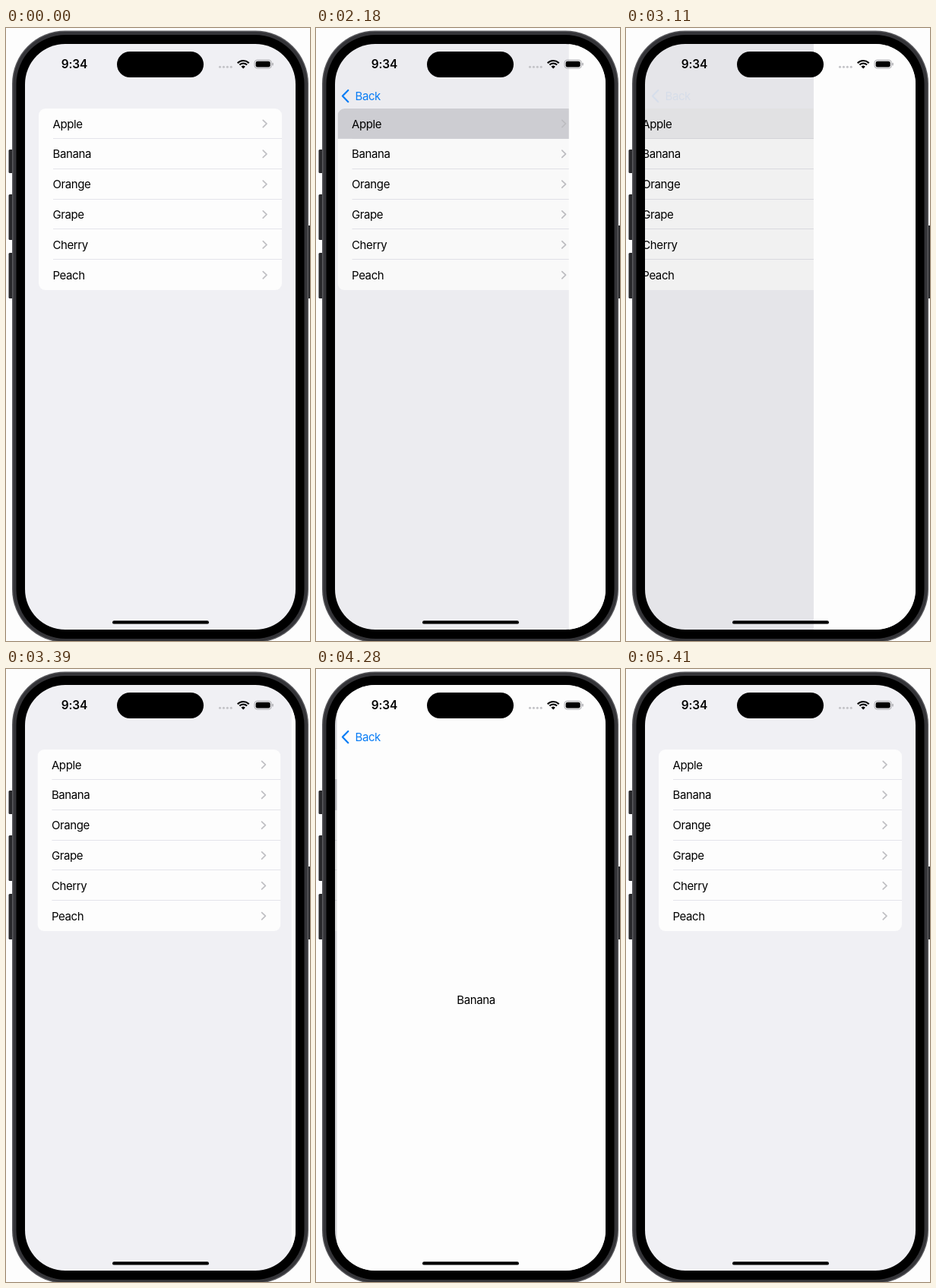
An HTML page with a canvas for the animation above (5450 ms loop, 400x807 px).

```html
<!DOCTYPE html>
<html lang="en">
<head>
<meta charset="utf-8">
<title>Fruit list</title>
<style>
html, body { margin: 0; width: 100%; height: 100%; overflow: hidden; background: #fdfdfd; }
canvas { display: block; width: 400px; height: 807px; }
</style>
</head>
<body>
<canvas id="stage"></canvas>
<script>
const W = 400, H = 807, LOOP = 5450;
const FRUITS = ['Apple', 'Banana', 'Orange', 'Grape', 'Cherry', 'Peach'];
// A tap pushes the detail page; a swipe of the given length pulls it away
const VISITS = [
  { row: 0, push: 2145, swipe: 2637, length: 813 },
  { row: 1, push: 3885, swipe: 4297, length: 926 }
];
const SCREEN = { x: 25, y: 21, w: 356, h: 771 };
const CARD = { x: 43, y: 106, w: 320, row: 39.85 };
const PAPER = '#fdfdfd';
const FONT = 'Inter, "Liberation Sans", sans-serif';

const canvas = document.getElementById('stage');
const ctx = canvas.getContext('2d');
const dpr = window.devicePixelRatio || 1;
canvas.width = W * dpr;
canvas.height = H * dpr;

const clamp = v => Math.max(0, Math.min(1, v));
const smooth = u => u * u * (3 - 2 * u);

// Critically damped spring, 0 to 1
function spring(ms) {
  if (ms <= 0) return 0;
  const k = ms * 0.0178;
  return 1 - (1 + k) * Math.exp(-k);
}

function rounded(x, y, w, h, r) {
  ctx.beginPath();
  ctx.roundRect(x, y, w, h, r);
}

function fillRound(x, y, w, h, r, color) {
  rounded(x, y, w, h, r);
  ctx.fillStyle = color;
  ctx.fill();
}

function line(points, color, width) {
  ctx.beginPath();
  points.forEach(([x, y]) => ctx.lineTo(x, y));
  ctx.strokeStyle = color;
  ctx.lineWidth = width;
  ctx.lineCap = ctx.lineJoin = 'round';
  ctx.stroke();
}

function label(str, x, y, color = '#000', align = 'left', weight = 400, size = 15, gap = -0.4) {
  ctx.font = `${weight} ${size}px ${FONT}`;
  ctx.letterSpacing = gap + 'px';
  ctx.textAlign = align;
  ctx.fillStyle = color;
  ctx.fillText(str, x, y);
}

function drawBody() {
  ctx.fillStyle = PAPER;
  ctx.fillRect(0, 0, W, H);
  for (const [y, h] of [[160, 31], [219, 60], [296, 60]]) fillRound(3.5, y, 8, h, 1.5, '#29292c');
  fillRound(394, 260, 6.5, 96, 1, '#29292c');
  fillRound(8, 3.5, 390, 805.5, 70, '#58585c');
  fillRound(9.5, 5, 387, 802.5, 68, '#343438');
  fillRound(13.5, 9, 379, 795, 65, '#000');
}

function drawList(shift, cover, mark) {
  ctx.fillStyle = '#f0f0f4';
  ctx.fillRect(SCREEN.x, SCREEN.y, SCREEN.w, SCREEN.h);
  ctx.save();
  ctx.translate(-shift, 0);
  const { x, y, w, row } = CARD;
  const height = row * FRUITS.length;

  ctx.save();
  rounded(x, y, w, height, 9);
  ctx.clip();
  ctx.fillStyle = PAPER;
  ctx.fillRect(x, y, w, height);
  for (let i = 1; i < FRUITS.length; i++) {
    ctx.fillStyle = '#e4e4ea';
    ctx.fillRect(62, Math.round(y + i * row) - 1, w, 1);
  }
  if (mark.alpha > 0) {
    ctx.globalAlpha = mark.alpha;
    ctx.fillStyle = '#d0d0d5';
    ctx.fillRect(x, y + mark.row * row - 0.5, w, row + 0.5);
  }
  ctx.restore();

  FRUITS.forEach((name, i) => {
    const mid = y + (i + 0.5) * row;
    label(name, 61.5, mid + 5.7);
    line([[338.2, mid - 4.6], [343, mid], [338.2, mid + 4.6]], '#c0c0c4', 1.7);
  });
  ctx.restore();

  ctx.fillStyle = `rgba(0,0,0,${cover * 0.13})`;
  ctx.fillRect(SCREEN.x, SCREEN.y, SCREEN.w, SCREEN.h);
}

function drawDetail(name, offset) {
  const x = SCREEN.x + offset;
  ctx.fillStyle = PAPER;
  ctx.fillRect(x, SCREEN.y, SCREEN.w, SCREEN.h);
  label(name, 208 + offset, 441, '#000', 'center');
}

function drawBack(alpha) {
  ctx.save();
  ctx.globalAlpha = alpha;
  const blue = '#0a7df5';
  line([[42.3, 82], [34.9, 89.6], [42.3, 97.2]], blue, 2.2);
  label('Back', 51.5, 95, blue);
  ctx.restore();
}

function drawStatus() {
  label('9:34', 90, 53.2, '#000', 'center', 600, 15.4, -0.1);
  fillRound(146, 31, 114, 34, 17, '#000');
  for (let i = 0; i < 4; i++) fillRound(280 + i * 4.9, 49.7, 3, 3, 1.5, '#c2c2c6');

  // Wi-Fi arcs fanning up from one point
  ctx.strokeStyle = '#000';
  ctx.lineCap = 'butt';
  ctx.lineWidth = 2.2;
  for (const r of [10.2, 6.7]) {
    ctx.beginPath();
    ctx.arc(312.2, 53.2, r, -Math.PI * 0.76, -Math.PI * 0.24);
    ctx.stroke();
  }
  ctx.beginPath();
  ctx.moveTo(312.2, 53.4);
  ctx.arc(312.2, 53.4, 3.7, -Math.PI * 0.76, -Math.PI * 0.24);
  ctx.fillStyle = '#000';
  ctx.fill();

  rounded(327, 42.2, 22.3, 10.8, 3.5);
  ctx.strokeStyle = '#a6a6aa';
  ctx.lineWidth = 1;
  ctx.stroke();
  fillRound(328.6, 43.8, 19.1, 7.6, 2.2, '#000');
  fillRound(350.4, 45.8, 1.3, 3.6, 0.8, '#a6a6aa');
  fillRound(140, 780.2, 127, 4.4, 2.2, '#000');
}

function draw(t) {
  const visit = t < 3700 ? VISITS[0] : VISITS[1];
  const pulled = smooth(clamp((t - visit.swipe) / visit.length));
  const cover = spring(t - visit.push) * (1 - pulled);
  const pressed = t >= visit.push - 100;
  const mark = { row: visit.row, alpha: pressed ? 1 - pulled : 0 };
  const back = clamp((t - visit.push) / 35) * clamp(1 - pulled * 1.5);

  ctx.setTransform(dpr, 0, 0, dpr, 0, 0);
  drawBody();
  ctx.save();
  rounded(SCREEN.x, SCREEN.y, SCREEN.w, SCREEN.h, 53);
  ctx.clip();
  drawList(cover * SCREEN.w * 0.3, cover, mark);
  if (cover > 0) drawDetail(FRUITS[visit.row], SCREEN.w * (1 - cover));
  if (back > 0) drawBack(back);
  drawStatus();
  ctx.restore();
}

const start = performance.now();
function tick() {
  draw((performance.now() - start) % LOOP);
  requestAnimationFrame(tick);
}
tick();
</script>
</body>
</html>
```
